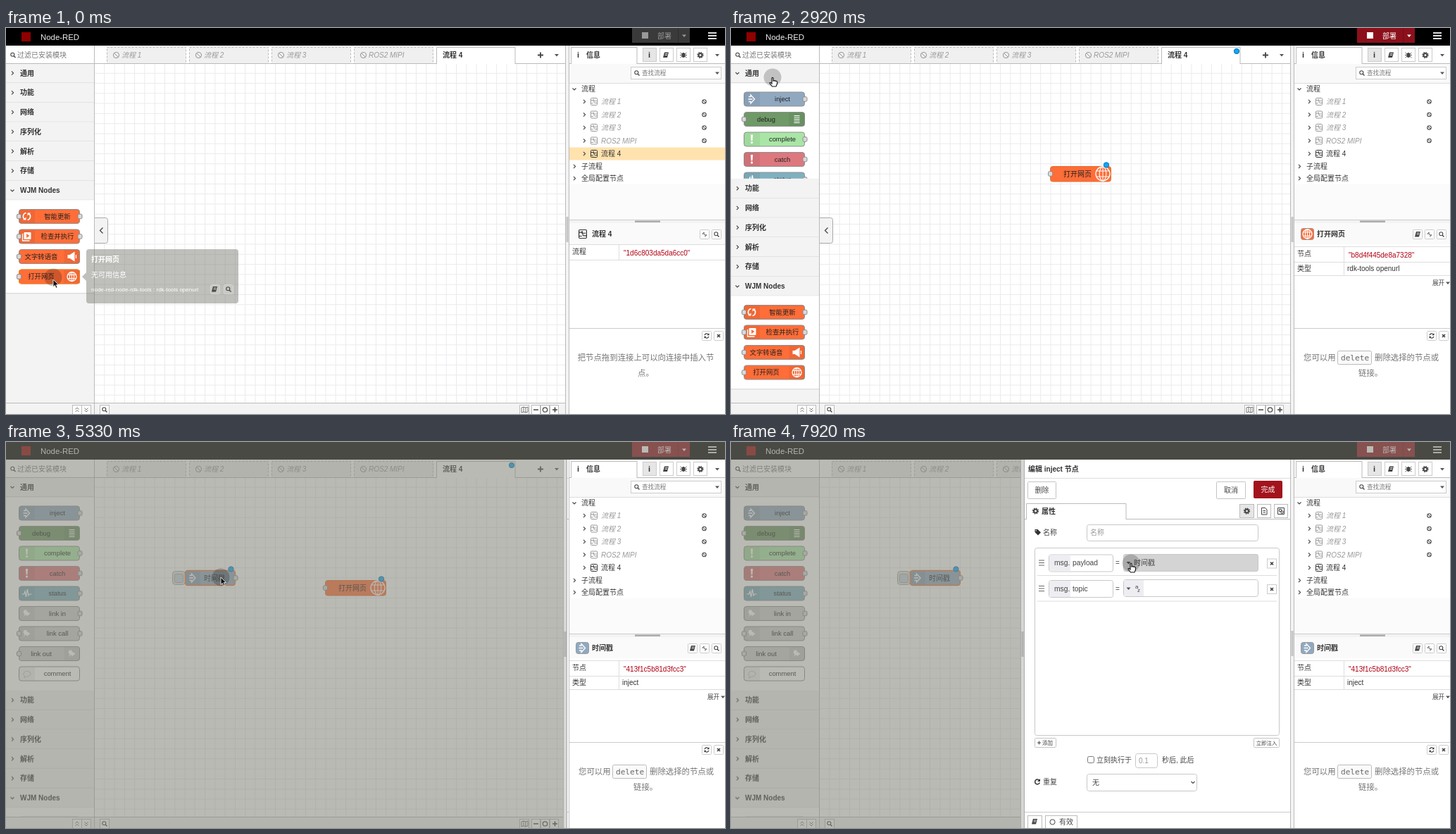
An HTML page for the animation above (8000 ms loop, 1021 by 548 pixels).

```html
<!DOCTYPE html>
<html lang="zh-CN">
<head>
<meta charset="utf-8">
<title>Flow editor</title>
<style>
html,body{margin:0;width:100%;height:100%;overflow:hidden;background:#fff}
svg{display:block}
text{font-family:"Liberation Sans","Noto Sans CJK SC","Noto Sans CJK",sans-serif;white-space:pre}
.mono{font-family:"DejaVu Sans Mono",monospace}
.b{font-weight:bold}
.i{font-style:italic}
.mid{text-anchor:middle}
.a{animation:8s linear -5ms infinite}
</style>
</head>
<body>
<svg id="stage" width="1021" height="548" viewBox="0 0 1021 548"></svg>
<script>
const TICKS = 96;          // 12 per second over 8 s
let css = '';

// Timeline helpers: keys are ticks
function track(name, keys, hard) {
  const at = Object.keys(keys).map(Number);
  const rules = at.map((k, i) => {
    const n = (at[i + 1] ?? TICKS) - k;
    const ease = hard ? 'step-end' : `steps(${Math.max(n, 1)})`;
    return `${k / TICKS * 100}%{${keys[k]};animation-timing-function:${ease}}`;
  });
  if (at.at(-1) < TICKS) rules.push(`100%{${keys[at.at(-1)]}}`);
  css += `@keyframes ${name}{${rules.join('')}}`;
}
const anim = (name, body) => `<g class="a" style="animation-name:${name}">${body}</g>`;
function move(name, points, body) {
  const keys = {};
  for (const k in points) keys[k] = `transform:translate(${points[k][0]}px,${points[k][1]}px)`;
  track(name, keys);
  return anim(name, body);
}
let shown = 0;
function show(spans, body) {
  const name = 'show' + shown++, keys = {0: 'opacity:0'};
  for (const [from, to] of spans) {
    keys[from] = 'opacity:1';
    if (to < TICKS) keys[to] = 'opacity:0';
  }
  track(name, keys, true);
  return anim(name, body);
}

// Drawing helpers
const rect = (x, y, w, h, fill, more = '') => `<rect x="${x}" y="${y}" width="${w}" height="${h}" fill="${fill}" ${more}/>`;
const box = (x, y, w, h, fill = '#fff', line = '#bbb', r = 0) => rect(x + .5, y + .5, w - 1, h - 1, fill, `stroke="${line}" rx="${r}"`);
const text = (x, y, s, size = 10, fill = '#444', cls = '') => `<text x="${x}" y="${y + size * .36}" font-size="${size}" fill="${fill}" class="${cls}">${s}</text>`;
const line = (d, color = '#bbb', w = 1, more = '') => `<path d="${d}" fill="none" stroke="${color}" stroke-width="${w}" ${more}/>`;
const shape = (d, fill, more = '') => `<path d="${d}" fill="${fill}" ${more}/>`;
const circle = (x, y, r, fill, more = '') => `<circle cx="${x}" cy="${y}" r="${r}" fill="${fill}" ${more}/>`;
const at = (x, y, body) => `<g transform="translate(${x} ${y})">${body}</g>`;

const chevron = (x, y, open) => line(open ? `M${x - 2.5} ${y - 1}l2.5 2.5 2.5-2.5` : `M${x - 1} ${y - 2.7}l2.6 2.7-2.6 2.7`, '#444', 1.1);
const caret = (x, y, c = '#555') => shape(`M${x - 3} ${y - 1.5}h6l-3 3.4z`, c);
const search = (x, y) => circle(x - .7, y - .7, 2.5, 'none', 'stroke="#444" stroke-width="1.1"') + line(`M${x + 1.2} ${y + 1.2}l2.3 2.3`, '#444', 1.4);
const ban = (x, y, r, c) => circle(x, y, r, 'none', `stroke="${c}" stroke-width="1.1"`) + line(`M${x - r * .7} ${y - r * .7}l${r * 1.4} ${r * 1.4}`, c);
const gear = (x, y) => circle(x, y, 2.5, 'none', 'stroke="#444" stroke-width="2"') + circle(x, y, 4, 'none', 'stroke="#444" stroke-width="1.3" stroke-dasharray="1.6 1.54"');
const book = (x, y) => shape(`M${x - 2} ${y - 4}h6l-2 7.5h-6z`, '#444') + line(`M${x - 1} ${y - 2}h3.5m-4 2h3.5`, '#fff', .8);
const cross = (x, y) => line(`M${x - 2} ${y - 2}l4 4m0-4l-4 4`, '#444', 1.7);
const turn = (x, y) => line(`M${x + 2.8} ${y - 2}a3.4 3.4 0 1 0 .5 3`, '#333', 1.5) + shape(`M${x + 4} ${y - 4.5}v4h-4z`, '#333');
const reload = (x, y) => line(`M${x - 3} ${y - .8}a3.1 3.1 0 0 1 5.6-1M${x + 3} ${y + .8}a3.1 3.1 0 0 1-5.6 1`, '#333', 1.1) +
  shape(`M${x + 3.5} ${y - 3.8}v3h-3zM${x - 3.5} ${y + 3.8}v-3h3z`, '#333');
const link = (x, y) => line(`M${x - 1} ${y - 1}l2 2M${x - 2} ${y}a1.3 1.3 0 1 1 2-2M${x + 2} ${y}a1.3 1.3 0 1 1-2 2`, '#444');
const flowIcon = (x, y, c, k = 1) => at(x, y, `<g transform="scale(${k})">` +
  rect(-4.5, -5, 9, 10, 'none', `rx="1" stroke="${c}"`) + line('M-4.5-2h3.5m1-1h-1v2h4.5M-1-2q1 0 1 2t1 2h3.5M-4.5 2.5h3.5', c, .9) + '</g>');

const globe = r => circle(0, 0, r, 'none', 'stroke="#fff" stroke-width="1.3"') +
  `<ellipse rx="${r * .48}" ry="${r}" fill="none" stroke="#fff" stroke-width="1.1"/>` +
  line(`M0 ${-r}V${r}M${-r * .9} ${-r * .4}h${r * 1.8}M${-r * .9} ${r * .4}h${r * 1.8}`, '#fff');
const icons = {
  inject: line('M-4.5-3.5h3v-2.5l5.5 6-5.5 6V3.5h-3M-5 0h6', '#fff', 1.3),
  debug: line('M-4-5h8m-8 2.5h8M-4 0h8m-8 2.5h8M-4 5h8', '#fff', 1.2),
  bang: shape('M-1.6-6.5h3.2L.9 2h-1.8z', '#fff') + circle(0, 4.6, 1.6, '#fff'),
  pulse: line('M-7 1h3l1.5-4L-1 5 .8-6 2.5 3 4 1h3', '#fff', 1.2),
  link: shape('M-4-5h4v2l5 3-5 4V2h-2L-5 5-3 1-5-1z', '#fff'),
  note: line('M-3 3a5 3.8 0 1 1 3 1l-4 2z', '#bbc'),
  refresh: line('M-1-5a5 5 0 0 0-2 9M1 5a5 5 0 0 0 2-9', '#fff', 1.6) + shape('M-5.5 5h4.5V1zM5.5-5H1v4z', '#fff'),
  play: rect(-4, -6, 10, 10, '#fff', 'rx="1"') + shape('M-.5-4v6l4.5-3z', '#ff6d38') + line('M-6-4V6H4', '#fff', 1.3),
  horn: shape('M-6-2.5h3L4-7V7L-3 2.5h-3z', '#fff') + line('M6-2.5v5', '#fff', 1.2),
  globe: globe(6.5)
};
const ORANGE = '#ff6d38', STEEL = '#90a9c0';
const port = (x, y) => rect(x - 3, y - 3.3, 6, 6.6, '#d9d9d9', 'rx="1.8" stroke="#8c8c8c"');

// ports: 'l', 'r' or both; side: where the icon sits
function node(x, y, label, fill, icon, ports, side = 'l', edge = '#8f8f8f', w = 87) {
  const ix = side === 'l' ? x : x + w - 23;
  return rect(x + .5, y - 10, w - 1, 20, fill, `rx="3.5" stroke="${edge}"`) +
    rect(ix + .5, y - 9.5, 22.5, 19, '#000', 'opacity=".06"') +
    at(ix + 11.5, y, icons[icon]) +
    text(side === 'l' ? x + 55 : x + 32, y, label, 9.4, '#222', 'mid') +
    (ports.includes('l') ? port(x + .5, y) : '') + (ports.includes('r') ? port(x + w, y) : '');
}
const openNode = (x, y, edge) => node(x, y, '打开网页', ORANGE, 'globe', 'l', 'r', edge);
const injectNode = (x, y, edge) => node(x, y, 'inject', STEEL, 'inject', 'r', 'l', edge);
const dot = (x, y) => circle(x, y, 3.7, '#12a5f4', 'stroke="#0b76b5"');

// Header
function header() {
  const deploy = (bg, fg) => rect(889, 0, 82, 21, bg) + rect(903, 6, 9, 9, fg) + text(925, 11, '部署', 10, fg) +
    line('M954.5 0v21', '#0003') + caret(963, 11, fg);
  return rect(0, 0, 1021, 25, '#000') + rect(22, 6, 13, 13, '#8f0000') + text(49, 12.5, 'Node-RED', 11.4, '#eee') +
    deploy('#3a3a3a', '#999') + show([[14, TICKS]], deploy('#8c101c', '#fff')) +
    line('M997 7h12m-12 4h12m-12 4h12', '#ddd', 2);
}

// Workspace
function workspace() {
  const pitch = 14.28, height = 532;
  let grid = '';
  for (let x = 139.8; x < 794; x += pitch) grid += `M${x.toFixed(1)} 50V${height}`;
  for (let y = 50 + pitch; y < height; y += pitch) grid += `M126 ${y.toFixed(1)}H794`;
  const tabs = ['流程 1', '流程 2', '流程 3', 'ROS2 MIPI'].map((name, i) => {
    const x = 143 + 117 * i;
    return rect(x + .5, 27.5, 112, 23, '#f0f0f0', 'stroke="#bbb" stroke-dasharray="3 2"') + ban(x + 13.5, 38.5, 4, '#999') + text(x + 21, 38.5, name, 10, '#999', 'i');
  }).join('');
  return rect(126, 25, 668, 523, '#fff') + line(grid, '#ebebef') + tabs + line('M126 50.5h668') +
    shape('M611.5 51V27.5h111.5V51', '#fff', 'stroke="#bbb"') + text(620, 38.5, '流程 4', 10, '#333', 'b') +
    line('M755 38.5h8m-4-4v8', '#444', 1.8) + caret(782, 38.5) +
    rect(126, 532, 668, 16, '#f3f3f3') + line('M126 532.5h668') +
    box(133, 535, 14, 14) + search(140, 542) + box(729, 535, 14, 14) + line('M732 539l3-1 3 1 3-1v7l-3 1-3-1-3 1zm3-1v7m3-6v7', '#555', .8) +
    box(746, 535, 13, 14) + box(759, 535, 13, 14) + box(772, 535, 13, 14) +
    line('M749 542h7m20 0h7m-3.5-3.5v7', '#444', 1.7) + circle(765.5, 542, 3.2, 'none', 'stroke="#444" stroke-width="1.3"') +
    show([[14, TICKS]], dot(718, 33) + rect(453.5, 196.5, 86, 21.5, ORANGE, 'rx="3.5" stroke="#e0702f"') +
      text(472, 207, '打开网页', 10, '#222') + at(528, 207, globe(10)) + port(453.5, 207) + dot(533, 194.5)) +
    show([[52, TICKS]], box(236, 183, 19, 20, '#ddd', '#aaa', 4) + box(239, 187, 13, 13, '#c5cfdd', '#aaa', 2) +
      rect(254.5, 182.5, 71, 21, STEEL, 'rx="3.5" stroke="#f0752a" stroke-width="1.4"') + rect(255.5, 183.5, 20, 19, '#0001') +
      at(265, 193, icons.inject) + text(281, 193, '时间戳', 10, '#222') + port(326, 193) + dot(319.5, 180.5));
}

// Palette
function palette() {
  const step = 27.75;
  const head = (i, name, open) => {
    const y = 50 + step * i;
    return rect(0, y, 125, step, '#f3f3f3') + line(`M0 ${y + step}h125`, '#d4d4d4') +
      (open === null ? '' : chevron(9, y + 14, open)) + text(20, y + 14, name, 10, '#333', 'b');
  };
  const common = [
    ['inject', STEEL, 'inject', 'r'], ['debug', '#6f9967', 'debug', 'l', 'r'], ['complete', '#a9e6a6', 'bang', 'r'],
    ['catch', '#dc787e', 'bang', 'r'], ['status', '#7fb0c0', 'pulse', 'r'], ['link in', '#d0d0d0', 'link', 'r'],
    ['link call', '#d0d0d0', 'link', 'lr'], ['link out', '#d0d0d0', 'link', 'l', 'r'], ['comment', '#fff', 'note', '']
  ].map((n, i) => node(18, 101 + 28.5 * i, ...n)).join('');
  const tools = [
    ['智能更新', 'refresh', 'lr'], ['检查并执行', 'play', 'lr'], ['文字转语音', 'horn', 'l', 'r'], ['打开网页', 'globe', 'l', 'r']
  ].map(([label, ...rest], i) => node(18, 267.5 + 28.5 * i, label, ORANGE, ...rest)).join('');
  const lower = rect(0, 78, 125, 600, '#f3f3f3') +
    ['功能', '网络', '序列化', '解析', '存储'].map((n, i) => head(i + 1, n, false)).join('') +
    head(6, 'WJM Nodes', true) + rect(0, 244.2, 125, 132.5, '#fff') + line('M0 376.7h125', '#d4d4d4') + tools;
  return rect(0, 25, 125, 523, '#fff') + common + show([[41, 45]], injectNode(18, 101, '#ff7f0e')) + head(0, '通用', null) +
    show([[0, 34]], chevron(9, 64, false)) + show([[34, TICKS]], chevron(9, 64, true)) +
    move('unfold', {0: [0, 0], 33: [0, 0], 34: [0, 18], 35: [0, 136], 36: [0, 257], 37: [0, 274.7]}, lower) +
    show([[0, 1]], openNode(18, 353, '#ff7f0e')) +
    rect(0, 25, 125, 25, '#fff') + line('M0 50.5h125') + search(10, 38.5) + text(16, 38.5, '过滤已安装模块', 10, '#777') +
    rect(0, 532, 125, 16, '#f3f3f3') + line('M0 532.5h125M125.5 25v523') +
    box(94, 535, 14, 14) + box(107, 535, 14, 14) +
    line('M98.5 541.5l2.5-2.5 2.5 2.5m-5 3.5l2.5-2.5 2.5 2.5M111.5 539.5l2.5 2.5 2.5-2.5m-5 3l2.5 2.5 2.5-2.5', '#666', .9);
}
const handle = () => move('handle', {0: [0, 0], 1: [0, 0], 2: [-8, 0], 3: [-20, 0], 27: [-20, 0], 28: [-4.5, 0], 29: [0, 0], 46: [0, 0], 47: [-8, 0], 48: [-20, 0]},
  box(120, 269, 25, 37, '#f3f3f3', '#aaa', 3) + line('M137.5 283.5l-4 4 4 4', '#444', 1.3));

function tooltip() {
  track('fade', {0: 'opacity:1', 1: 'opacity:.4', 2: 'opacity:0'}, true);
  return anim('fade', shape('M118 314h208q4 0 4 4v69q0 4-4 4H118q-4 0-4-4v-28l-6-6 6-6v-29q0-4 4-4z', '#777770', 'opacity=".47"') +
    text(121, 328.5, '打开网页', 10, '#fff', 'b') + text(121, 350, '无可用信息', 10, '#fff') +
    text(121, 371, 'node-red-node-rdk-tools : rdk-tools openurl', 8, '#fff') +
    box(290, 364, 14, 14, '#c8c8c4', '#d4d4d0', 2) + book(296, 371) + box(309, 364, 14, 14, '#c8c8c4', '#d4d4d0', 2) + search(316, 371));
}

// Right sidebar
const divider = () => rect(794, 25, 6, 523, '#f3f3f3') + line('M794.5 25v523M799.5 25v523') + rect(795.5, 268, 3, 36, '#c4c4c4');

function sidebar() {
  const flowRow = (y, name, on) => {
    const c = on ? '#333' : '#999';
    return chevron(821, y) + flowIcon(835, y, c) + text(845, y, name, 10, c, on ? '' : 'i') + (on ? '' : ban(991.5, y, 2.7, '#444'));
  };
  const small = (x, y, icon) => box(x, y, 14, 14, '#fff', '#ccc', 1) + icon(x + 7, y + 7);
  const toolButton = (x, fill, icon) => box(x, 28, 20, 20, fill, '#ccc') + icon;
  const info = (title, icon, rows, more) => rect(800, 277, 221, 149, '#fff') + rect(800, 277, 221, 30, '#fafafa') + icon + text(832, 292.5, title, 10, '#333', 'b') +
    small(985, 286, link) + small(1002, 286, search) + more +
    rows.map(([y, h, key, value, color], i) => line(`M800 ${y + .5}h221M800 ${y + h + .5}h221M870.5 ${y}v${h}`, '#ddd') +
      text(804, y + h / 2 - (i ? 0 : 1), key, 10, '#333') + text(i ? 875 : 877, y + h / 2 + (i ? 0 : 1), value, 10, color)).join('');
  const nodeInfo = (title, fill, icon, id, type) => info(title,
    box(809, 284, 19, 17, fill, '#999', 3) + at(818.5, 292.5, icons[icon]),
    [[310, 22, '节点', `"${id}"`, '#b00012'], [332, 19, '类型', type, '#333']],
    small(968, 286, book) + text(996, 362, '展开', 8.6) + caret(1018, 362));
  const tip = rect(801, 452, 219, 60, '#fff');
  return rect(800, 25, 221, 523, '#fff') + divider() +
    line('M800 50.5h221') + shape('M802.5 51V27.5h93.5V51', '#fff', 'stroke="#bbb"') +
    text(811, 38.5, 'i', 11, '#333', 'b') + text(824, 38.5, '信息', 10, '#333', 'b') +
    toolButton(904, '#e6e6e6', text(912, 38.5, 'i', 11, '#333', 'b')) + toolButton(928, '#fff', book(937, 38.5)) +
    toolButton(952, '#fff', `<ellipse cx="962" cy="38.5" rx="2.4" ry="3.5" fill="#444"/>` + line('M957.5 35l9 7m0-7l-9 7m-.5-3.5h10', '#444', .9)) +
    toolButton(976, '#fff', gear(986, 38.5)) + caret(1010, 38.5) +
    rect(800, 51, 221, 27, '#f9f9f9') + line('M800 78.5h221', '#ddd') + box(887, 55, 129, 18, '#fff', '#ccc') + search(896, 64) + text(903, 64, '查找流程', 8.6, '#777') + caret(1010, 64) +
    chevron(807, 86.5, true) + text(817, 86.5, '流程', 10, '#333') +
    ['流程 1', '流程 2', '流程 3', 'ROS2 MIPI'].map((n, i) => flowRow(104.5 + 18.5 * i, n)).join('') +
    show([[0, 14]], rect(800, 169.5, 221, 18, '#ffe2ae')) + flowRow(178.5, '流程 4', true) +
    chevron(807, 196.5) + text(817, 196.5, '子流程', 10, '#333') + chevron(807, 213.5) + text(817, 213.5, '全局配置节点', 10, '#333') +
    rect(800, 222, 221, 50, '#fbfbfb') + rect(800, 272, 221, 5, '#f3f3f3') + line('M800 272.5h221m-221 5h221', '#ccc') + rect(893, 273.5, 36, 2.5, '#aaa') +
    show([[0, 14]], info('流程 4', flowIcon(819, 292.5, '#333', 1.2), [[307, 22, '流程', '"1d6c803da5da6cc0"', '#b00012']], '')) +
    show([[14, 52]], nodeInfo('打开网页', ORANGE, 'globe', 'b8d4f445de8a7328', 'rdk-tools openurl')) +
    show([[52, TICKS]], nodeInfo('时间戳', STEEL, 'inject', '413f1c5b81d3fcc3', 'inject')) +
    line('M800 426.5h221', '#ccc') + small(988, 430, reload) + small(1005, 430, cross) +
    text(908.5, 468, '把节点拖到连接上可以向连接中插入节', 11.4, '#777', 'mid') + text(908.5, 490, '点。', 11.4, '#777', 'mid') +
    show([[6, TICKS]], tip + text(813, 468, '您可以用', 11.4, '#777') + box(861, 458, 49, 20, '#fafafa', '#bbb', 2) +
      text(866, 468, 'delete', 11.1, '#666', 'mono') + text(914, 468, '删除选择的节点或', 11.4, '#777') + text(891, 490, '链接。', 11.4, '#777'));
}

// Edit tray
function tray() {
  const button = (x, y, w, h, label, size = 10, fill = '#fff', color = '#444') =>
    box(x, y, w, h, fill, fill === '#fff' ? '#c4c4c4' : fill, 1) + text(x + w / 2, y + h / 2, label, size, color, 'mid');
  const field = (x, y, w, h, fill = '#fff') => box(x, y, w, h, fill, '#c8c8c8', 3);
  const rule = (y, prop) => line(`M437 ${y - 3.5}h8m-8 3.5h8m-8 3.5h8`, '#666') +
    field(451, y - 12, 92, 25) + rect(452, y - 11, 30, 23, '#eeeef2') + text(459, y, 'msg.', 10.3) + text(485, y, prop, 10.3) +
    text(546, y, '=', 10) + box(761, y - 6, 14, 14, '#fff', '#ccc') + cross(768, y + 1) + line(`M435 ${y + 18}h340`, '#ddd');
  const body = rect(411, 25, 6, 523, '#d6d6d4') + line('M411.5 25v523M416.5 25v523', '#aaa') + rect(412.5, 269, 3, 36, '#b0b0b0') +
    rect(417, 25, 390, 523, '#fff') + text(422, 38, '编辑 inject 节点', 10, '#333', 'b') + line('M417 51.5h390', '#ddd') +
    button(421, 56, 41, 25, '删除') + button(689, 56, 42, 25, '取消') + button(742, 55, 41, 25, '完成', 10, '#a3131d', '#fff') +
    line('M417 109.5h390') + shape('M419.5 110V87.5h141.5V110', '#fff', 'stroke="#bbb"') + gear(432.5, 98) + text(441, 98, '属性', 10, '#333', 'b') +
    box(722, 88, 21, 20, '#e6e6e6') + gear(732.5, 98) + box(747, 88, 20, 20) + line('M753.5 93.5h5l2.5 2.5v7h-7.5zm2 4h3.5m-3.5 2.5h3.5', '#444') +
    box(771, 88, 20, 20) + line('M776.5 93.5h9v9h-9zm2 2h3v3h-3zm2.5 2.5h3v3h-3z', '#444') +
    shape('M431.5 124h4l4.5 4.5-4 4-4.5-4.5z', '#333') + circle(433.3, 125.8, .8, '#fff') +
    text(443, 128, '名称') + field(505, 117, 244, 24) + text(510, 128.5, '名称', 10, '#999') +
    field(431, 150, 348, 267) + rule(171.5, 'payload') + rule(208, 'topic') +
    field(557, 159, 192, 25, '#eeeef2') + show([[92, TICKS]], field(557, 159, 192, 25, '#d4d4d4')) +
    caret(564.5, 171.5) + text(572, 171.5, '时间戳', 10) +
    field(557, 195, 192, 25) + rect(558, 196, 28, 23, '#eeeef2') + caret(564.5, 208) + text(574, 205, 'a', 8) + text(577, 210.5, 'z', 8) +
    button(431, 420, 31, 14, '', 7.5) + line('M435 427h5m-2.5-2.5v5', '#444') + text(442, 427, '添加', 7.5) + button(742, 420, 37, 14, '立即注入', 7.4) +
    box(506, 446, 10, 10, '#fff', '#777', 2) + text(519, 451.5, '立刻执行于') + field(574, 442, 32, 21) + text(579, 452.5, '0.1', 10, '#999') + text(612, 451.5, '秒后, 此后') +
    turn(435, 482.5) + text(443, 482.5, '重复') + field(505, 471, 157, 25) + text(513, 483, '无') + chevron(656, 483, true) +
    line('M417 525.5h390', '#ccc') + box(421, 530, 21, 19) + book(431, 539) + box(446, 530, 46, 19) +
    circle(456.5, 539.5, 3.6, 'none', 'stroke="#444"') + text(466, 539, '有效');
  const slide = move('slide', {0: [390, 0], 64: [380, 0], 65: [166, 0], 66: [53.5, 0], 67: [0, 0]}, body);
  const shade = shape('M0 0h1021v25H794v523H0z', '#84847a', 'opacity=".56"');
  return show([[64, TICKS]], shade + `<clipPath id="trayArea">${rect(0, 25, 799, 523, '#000')}</clipPath><g clip-path="url(#trayArea)">${slide}</g>` +
    show([[67, TICKS]], divider()));
}

// Pointer and dragged nodes
function pointer() {
  const glyphs = show([[0, 1], [64, 92]], shape('M0 0v10.5l2.4-2.2 1.7 3.9 1.9-.8-1.7-3.8h3.3z', '#111', 'stroke="#fff" stroke-width=".8"')) +
    show([[1, 17], [45, 64]], shape('M0-5.5l2 2.5H.8v2.2H3V-2L5.5 0 3 2V.8H.8V3H2L0 5.5-2 3h1.2V.8H-3V2L-5.5 0-3-2v1.2h2.2V-3H-2z', '#111', 'stroke="#fff" stroke-width="1.6" paint-order="stroke"')) +
    show([[17, 27]], line('M-5.5 0h11M0-5.5v11', '#fff', 2) + line('M-5.5 0h11M0-5.5v11', '#111')) +
    show([[27, 45], [92, TICKS]], shape('M-1 1q1.1-1.5 2 0v4q1-1 2 .2 1-.8 1.8.3 1.4-.6 1.7.8v3L5 13H-.5L-4 8.5q0-1.6 1.5-.8L-1 9z', '#fff', 'stroke="#111" stroke-width="1.1"'));
  const rest = {17: [515, 207], 22: [265, 178], 24: [265, 178]};
  const later = {31: [59, 70], 37: [59, 70], 43: [72, 100], 45: [72, 100], 49: [200, 152], 53: [305, 192], 68: [305, 192],
    74: [582, 162], 78: [582, 162], 84: [572, 141], 85: [572, 141], 93: [568, 172]};
  return move('drag', {0: [18, 353], 1: [18, 353], 5: [165, 302], 10: [383.5, 220.5], 14: [453, 207]}, show([[1, 14]], openNode(0, 0, '#ff7f0e'))) +
    move('dragInject', {0: [18, 101], 45: [18, 101], 49: [136, 152], 53: [254, 193]}, show([[45, 52]], injectNode(0, 0, '#ff7f0e'))) +
    move('halo', {0: [67, 354], 1: [67, 354], 5: [225, 302], 10: [459, 220], 14: [515, 207], ...rest, 28: [100, 85], ...later}, circle(0, 0, 12.5, '#000', 'opacity=".2"')) +
    move('pointer', {0: [67, 357], 1: [70, 355], 5: [245, 296], 10: [481, 220], 14: [515, 207], ...rest, 28: [90, 76], ...later}, glyphs);
}

document.getElementById('stage').innerHTML =
  workspace() + handle() + palette() + tooltip() + header() + sidebar() + tray() + pointer();
const sheet = document.createElement('style');
sheet.textContent = css;
document.head.append(sheet);
</script>
</body>
</html>
```
